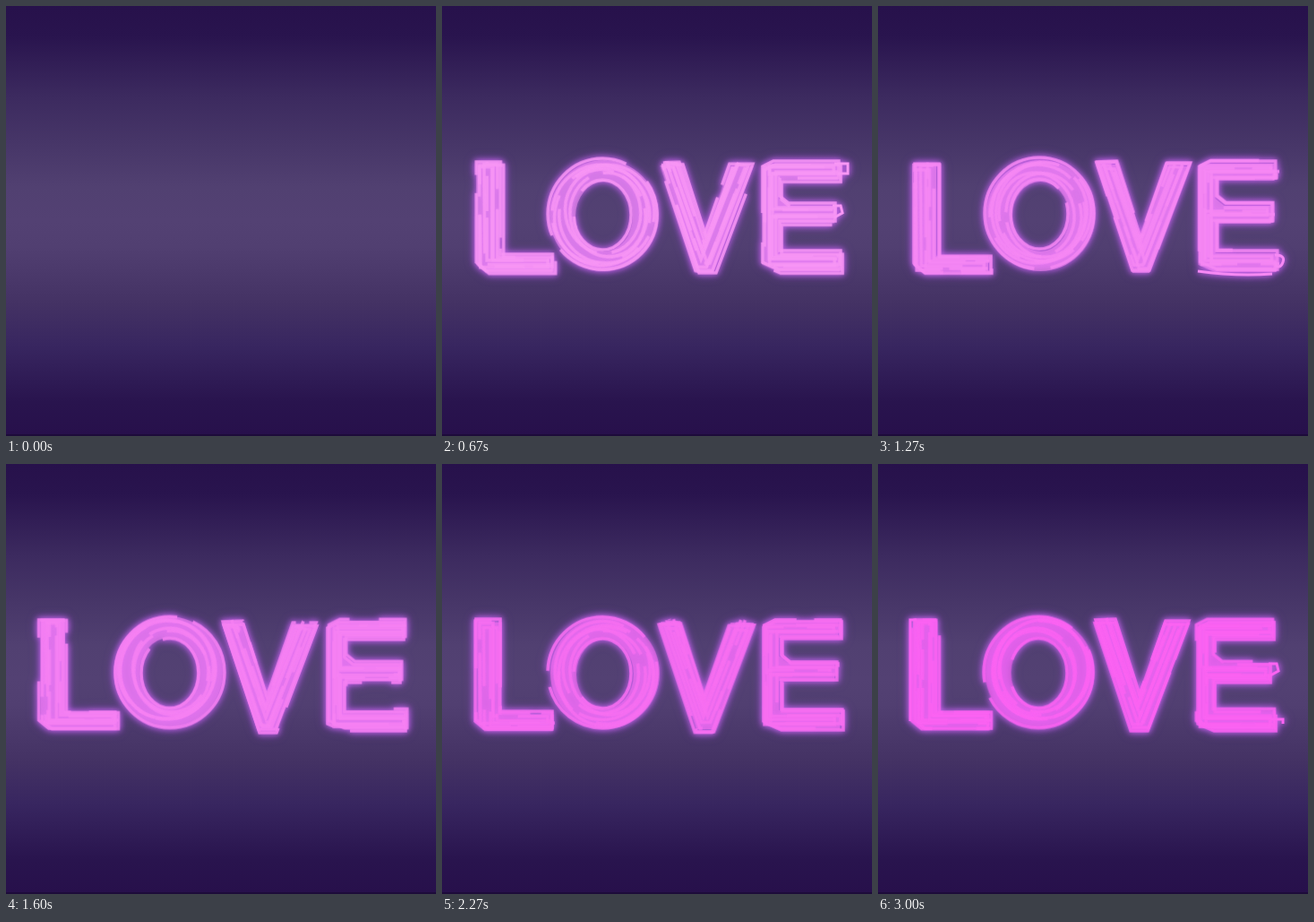
Recreate the animation shown at these times as an HTML page without scripts. Size 480x480 px, loop 3070 ms.

```html
<!DOCTYPE html>
<html lang="en">
<head>
<meta charset="utf-8">
<title>Neon love</title>
<style>
html, body { margin: 0; width: 100%; height: 100%; overflow: hidden; }
body {
  background:
    linear-gradient(#1d0b3a, #1d0b3a) 0 100% / 100% 2px no-repeat,
    linear-gradient(#27114b 0, #29144e 7%, #3c2a5f 21%, #473668 32%, #514071 42%,
      #534173 50%, #513f71 56%, #443264 69%, #382660 79%, #29144e 92%, #27104b 100%);
}
svg { display: block; width: 100%; height: 100%; }

/* 46 drawings per loop */
svg * { animation: 3.07s -8ms infinite; }

.word {
  fill: none;
  stroke: currentColor;
  stroke-width: 3.5;
  filter: drop-shadow(0 0 3px #d568f0) drop-shadow(0 0 4px #a04fe0b0);
  animation-name: tint;
  animation-timing-function: steps(9);
}
.body { fill: currentColor; stroke: none; animation-name: fill; animation-timing-function: steps(9); }

/* every strand hops round a small circle while its gaps jump along it */
.body use, .p use {
  --k: calc(var(--a) + var(--b));
  animation-name: hop, gaps;
  animation-timing-function: steps(46);
}
.p { opacity: .88; animation-timing-function: step-end; }
use:nth-child(1) { --b: 0; }
use:nth-child(2) { --b: 4; }
use:nth-child(3) { --b: 9; }
use:nth-child(4) { --b: 14; }

.body { --a: 11; --r: 1px; }
.p1 { --a: 17; --r: 2px; stroke-dasharray: 61 5 31 3; animation-name: in1; }
.p2 { --a: 7;  --r: 3px; stroke-dasharray: 38 9 46 7; animation-name: in2; }
.p3 { --a: 19; --r: 4px; stroke-dasharray: 70 6 19 5; animation-name: in3; }
.p4 { --a: 5;  --r: 3px; stroke-dasharray: 44 12 39 5; animation-name: in4; }
.p5 { --a: 13; --r: 4px; stroke-dasharray: 52 4 38 6; animation-name: in5; }
.p6 { --a: 3;  --r: 5px; stroke-dasharray: 66 8 22 4; animation-name: in6; }

.flick path { stroke-width: 3; opacity: 0; animation-timing-function: step-end; }
.top { animation-name: top; }
.low { animation-name: low; }
.curl { animation-name: curl; }
.left { animation-name: left; }
.mid { animation-name: mid; }

@keyframes hop {
  from { transform: rotate(0turn) translateX(var(--r)) rotate(0turn); }
  to { transform: rotate(calc(var(--k) * 1turn)) translateX(var(--r)) rotate(calc(var(--k) * -1turn)); }
}
@keyframes gaps {
  from { stroke-dashoffset: 0px; }
  to { stroke-dashoffset: calc(var(--k) * 100px); }
}
@keyframes tint {
  0%, 9% { color: #f184f1; }
  22% { color: #f896f5; }
  41% { color: #f688f4; }
  63% { color: #f678f2; }
  82% { color: #f868f1; }
  100% { color: #fb62f2; }
}
@keyframes fill {
  0%, 2% { opacity: 0; }
  9% { opacity: .38; }
  22% { opacity: .52; }
  41%, 100% { opacity: .6; }
}
@keyframes in1 { 0% { opacity: 0; } 2.17%, 100% { opacity: .88; } }
@keyframes in2 { 0% { opacity: 0; } 4.34%, 100% { opacity: .88; } }
@keyframes in3 { 0% { opacity: 0; } 6.52%, 100% { opacity: .88; } }
@keyframes in4 { 0% { opacity: 0; } 8.69%, 100% { opacity: .88; } }
@keyframes in5 { 0% { opacity: 0; } 13.04%, 100% { opacity: .88; } }
@keyframes in6 { 0% { opacity: 0; } 17.39%, 100% { opacity: .88; } }

@keyframes top { 0%, 28.26%, 89.13% { opacity: 0; } 19.56%, 78.26% { opacity: 1; } }
@keyframes low { 0%, 15.21% { opacity: 0; } 6.52%, 93.47%, 100% { opacity: 1; } }
@keyframes curl { 0%, 47.82%, 100% { opacity: 0; } 36.95% { opacity: 1; } }
@keyframes left { 0%, 69.56% { opacity: 0; } 58.69%, 93.47%, 100% { opacity: 1; } }
@keyframes mid { 0%, 26.08%, 69.56% { opacity: 0; } 17.39%, 58.69%, 93.47%, 100% { opacity: 1; } }
</style>
</head>
<body>
<svg viewBox="0 0 480 480" role="img" aria-label="LOVE">
  <defs>
    <!-- 1: edge, 2: inset, 3: spine -->
    <path id="L1" pathLength="100" d="M39 176H66V279H124V297H50L39 288Z"/>
    <path id="L2" pathLength="100" d="M45 180H60V284H121V292H46Z"/>
    <path id="L3" pathLength="100" d="M53 178V288H122"/>

    <path id="O1" pathLength="100" fill-rule="evenodd" d="M181 171a61 62 0 0 1 0 124a61 62 0 0 1 0-124ZM181 195a32 39 0 0 0 0 78a32 39 0 0 0 0-78Z"/>
    <ellipse id="O2" pathLength="100" cx="181" cy="233" rx="53" ry="55" transform="rotate(12 181 233)"/>
    <ellipse id="O3" pathLength="100" cx="181" cy="233" rx="42" ry="47" transform="rotate(-10 181 233)"/>

    <path id="V1" pathLength="100" d="M244 177L266 176L293 260L322 178L348 178L303 297H284Z"/>
    <path id="V2" pathLength="100" d="M250 179L261 180L293 272L328 181L341 182L298 291H288Z"/>
    <path id="V3" pathLength="100" d="M255 177L293 286L335 178"/>

    <path id="E1" pathLength="100" d="M358 181L370 175H443V194H377V214L387 222H439V242H377V275H445V296H376L358 288Z"/>
    <path id="E2" pathLength="100" d="M363 181H440V188H370V228H436V236H370V282H441V291H363Z"/>
    <path id="E3" pathLength="100" d="M443 184H367V287H443M367 232H438"/>
  </defs>

  <g class="word">
    <g class="body"><use href="#L1"/><use href="#O1"/><use href="#V1"/><use href="#E1"/></g>
    <g class="p p1"><use href="#L1"/><use href="#O1"/><use href="#V1"/><use href="#E1"/></g>
    <g class="p p2"><use href="#L2"/><use href="#O2"/><use href="#V2"/><use href="#E2"/></g>
    <g class="p p3"><use href="#L3"/><use href="#O3"/><use href="#V3"/><use href="#E3"/></g>
    <g class="p p4"><use href="#L1"/><use href="#O2"/><use href="#V1"/><use href="#E1"/></g>
    <g class="p p5"><use href="#L2"/><use href="#O3"/><use href="#V2"/><use href="#E2"/></g>
    <g class="p p6"><use href="#L3"/><use href="#O2"/><use href="#V3"/><use href="#E3"/></g>
    <g class="flick">
      <path class="top" d="M438 176H453V187H442"/>
      <path class="low" d="M438 285H452V290"/>
      <path class="curl" d="M357 296Q400 302 440 299M443 278q12 0 9 8t-9 3"/>
      <path class="left" d="M43 174H36V287"/>
      <path class="mid" d="M436 223H445L447 231L438 236"/>
    </g>
  </g>
</svg>
</body>
</html>
```
